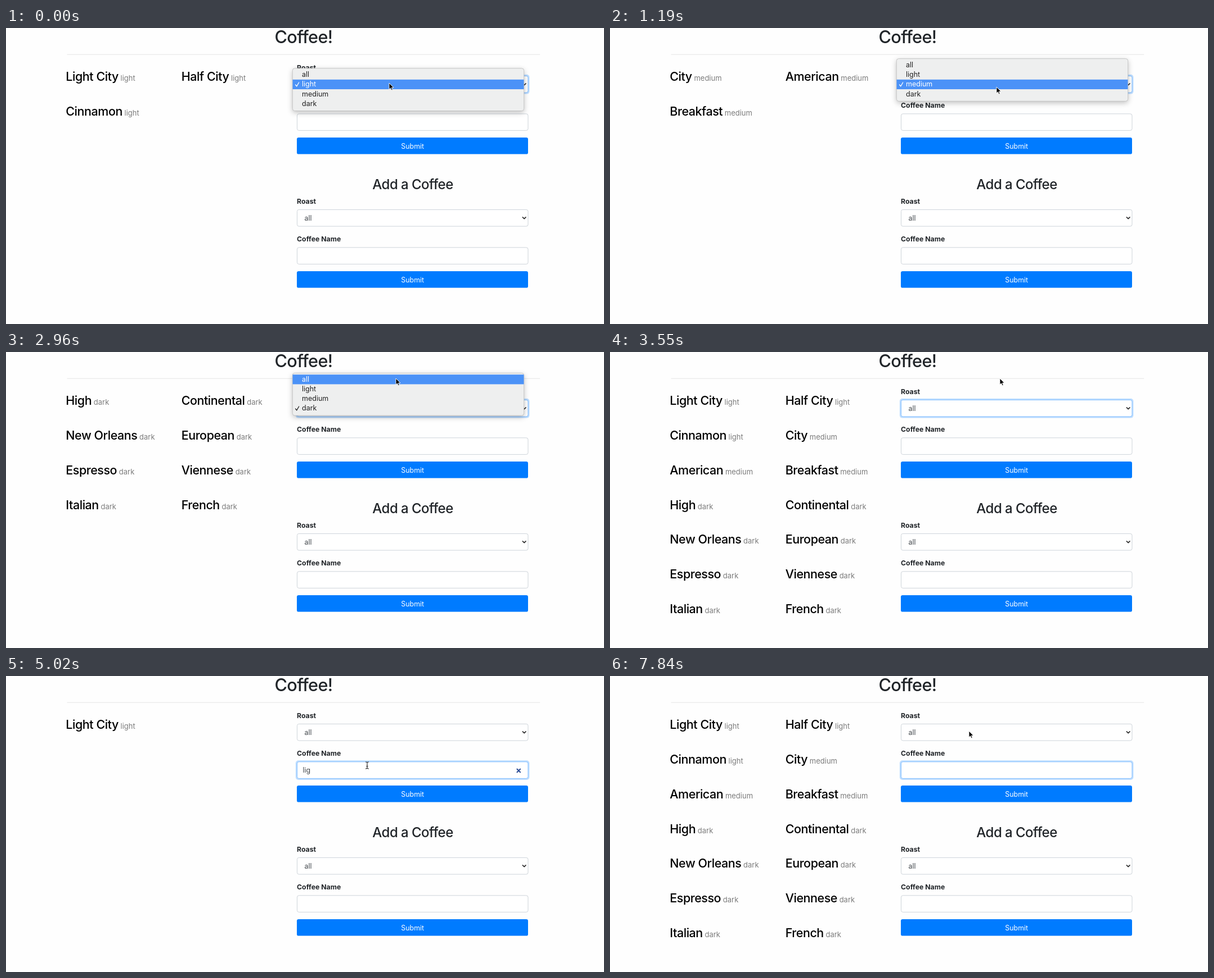
Write an HTML page that moves like this. It is 1063 px wide and 527 px high and loops after 7.99 s.

```html
<!DOCTYPE html>
<html lang="en">
<head>
<meta charset="utf-8">
<title>Coffee!</title>
<style>
  html, body { margin: 0; width: 100%; height: 100%; overflow: hidden; background: #fefefe; }
  svg { display: block; width: 100%; height: 100%; }
  text { font: 400 12.4px Inter, Roboto, sans-serif; fill: #212529; white-space: pre; }
  .title { font-size: 30.7px; font-weight: 500; letter-spacing: -.022em; text-anchor: middle; }
  .subtitle { font-size: 24.1px; font-weight: 500; letter-spacing: -.024em; text-anchor: middle; }
  .coffee { font-size: 21.5px; font-weight: 500; letter-spacing: -.0215em; fill: #000; }
  .roast { font-size: 13px; font-weight: 400; letter-spacing: 0; fill: #7c7c7c; }
  .label { font-size: 12.3px; font-weight: 700; }
  .value { fill: #43484d; }
  .button { fill: #fff; text-anchor: middle; }
  .field { fill: #fff; stroke: #ced4da; }
  .ring { fill: #bfdeff; }
  .menu { filter: drop-shadow(0 3px 5px rgba(0, 0, 0, .24)); }
  .option { font-size: 12.5px; fill: #222; }
  .hot { fill: #fff; }
  .line { fill: none; stroke-linecap: round; stroke-linejoin: round; }
</style>
</head>
<body>
<svg id="stage" viewBox="0 0 1063 527" xmlns="http://www.w3.org/2000/svg"></svg>
<script>
const LOOP = 7990;
const ROASTS = ['all', 'light', 'medium', 'dark'];
const COFFEES = [
  ['Light City', 1], ['Half City', 1], ['Cinnamon', 1],
  ['City', 2], ['American', 2], ['Breakfast', 2],
  ['High', 3], ['Continental', 3], ['New Orleans', 3], ['European', 3],
  ['Espresso', 3], ['Viennese', 3], ['Italian', 3], ['French', 3],
];
const ROW = 17.2;

// Each entry changes part of the state from its time on.
const open = (roast) => ({ menu: true, hot: roast, fade: 1 });
const at = (x, y, pointer = 'arrow') => ({ x, y, pointer });
const STEPS = [
  [0, { roast: 1, query: '', focus: 'select', caret: false, ...open(1), ...at(681, 98) }],
  [300, { hot: 2, ...at(685, 109) }],
  [450, at(687, 113)],
  [900, { fade: .1 }],
  [1050, { roast: 2, menu: false, ...at(687, 109) }],
  [1190, { ...open(2), ...at(687, 105) }],
  [1490, { hot: 3, ...at(687, 110) }],
  [1780, { hot: -1 }],
  [1930, { hot: 3 }],
  [2080, { fade: .1 }],
  [2220, { roast: 3, menu: false }],
  [2370, { ...open(3), ...at(688, 105) }],
  [2670, { hot: 2, ...at(690, 86) }],
  [2820, { hot: 1, ...at(692, 66) }],
  [2960, { hot: 0, ...at(693, 47) }],
  [3110, { hot: -1 }],
  [3260, { hot: 0 }],
  [3410, { fade: .1 }],
  [3550, { roast: 0, menu: false }],
  [3700, at(684, 86)],
  [3840, at(662, 122)],
  [3990, at(644, 155, 'beam')],
  [4140, at(642, 159, 'beam')],
  [4280, { focus: 'moving', caret: true }],
  [4430, { focus: 'input' }],
  ...[...'light'].map((_, i) => [4720 + 150 * i, { query: 'light'.slice(0, i + 1), caret: false }]),
  [5770, { query: 'ligh' }],
  [5920, { query: 'lig' }],
  [6060, { query: 'li' }],
  [6210, { query: 'l' }],
  [6360, { query: '', caret: true }],
  [6950, { caret: false }],
  [7100, at(641, 152, 'beam')],
  [7250, at(638, 137)],
  [7400, at(638, 117)],
  [7550, at(637, 98)],
  [7690, at(637, 87)],
  [7840, at(638, 98)],
];

const text = (cls, x, y, content) => `<text class="${cls}" x="${x}" y="${y}">${content}</text>`;
const rect = (x, y, w, h, r, attrs) =>
  `<rect x="${x}" y="${y}" width="${w}" height="${h}" rx="${r}" ${attrs}/>`;
const line = (d, color, width) =>
  `<path class="line" d="${d}" stroke="${color}" stroke-width="${width}"/>`;

function field(y, focused, tinted) {
  const ring = focused ? rect(514.8, y - 2.6, 415.7, 34.8, 5, 'class="ring"') : '';
  const tint = focused || tinted ? `style="stroke:${focused ? '#80bdff' : '#b3d2f2'}"` : '';
  return ring + rect(517.5, y, 410.5, 29.6, 3.2, `class="field" ${tint}`);
}

function form(roast, query, focus, caret) {
  return text('label', 517, 74.5, 'Roast')
    + field(85.4, focus === 'select', focus === 'moving')
    + text('value', 530.5, 104.8, ROASTS[roast])
    + line('M918.4 98.8l2.8 2.9 2.8-2.9', '#333', 1.7)
    + text('label', 517, 141.6, 'Coffee Name')
    + field(152.8, focus === 'input' || focus === 'moving')
    + text('value', 527.4, 172, query)
    + (caret ? line('M528.4 161v13', '#333', 1) : '')
    + (query ? line('M908.5 165.7l5.6 5.6m0-5.6l-5.6 5.6', '#2b4c96', 2.1) : '')
    + rect(517, 195, 411, 29.6, 3.2, 'fill="#007bff"')
    + text('button', 722.7, 214.6, 'Submit');
}

function coffees({ roast, query }) {
  return COFFEES
    .filter(([name, kind]) => (!roast || kind === roast) && name.toLowerCase().includes(query))
    .map(([name, kind], i) => text('coffee', 106.3 + 205.4 * (i % 2), 94 + 61.85 * (i >> 1),
      `${name}<tspan class="roast"> ${ROASTS[kind]}</tspan>`))
    .join('');
}

function menu({ roast, hot, fade }) {
  const top = 91.8 - ROW * roast;
  const options = ROASTS.map((name, i) => {
    const y = top + ROW * i;
    const lit = i === hot;
    return (lit ? rect(509.5, y, 411, ROW, 0, 'fill="#4b92f7"') : '')
      + text(lit ? 'option hot' : 'option', 526, y + 12.5, name)
      + (i === roast ? line(`M514.6 ${y + 9.2}l2.1 2.8 4-6.8`, lit ? '#fff' : '#222', 1.3) : '');
  }).join('');
  return `<g opacity="${fade}">`
    + rect(509.3, top - 2.8, 411.4, 75.7, 4, 'class="menu" fill="#eeefef" stroke="#bcbcbc" stroke-width=".8"')
    + options + '</g>';
}

function pointer({ x, y, pointer }) {
  const shape = pointer === 'beam'
    ? line('M-2.6-6q2.6 0 2.6 1.6v8.8q0 1.6-2.6 1.6M2.6-6q-2.6 0-2.6 1.6M2.6 6q-2.6 0-2.6-1.6M-1.3 1.8h2.6', '#222', 1.1)
    : '<path d="M0 0v11.2l2.6-2.4 1.7 3.9 1.9-.8-1.7-3.8h3.6z" fill="#000" stroke="#fff" stroke-width=".9"/>';
  return `<g transform="translate(${x} ${y})">${shape}</g>`;
}

function scene(state) {
  return text('title', 529, 27, 'Coffee!')
    + line('M109 47.2h840', '#e5e5e5', 1)
    + coffees(state)
    + form(state.roast, state.query, state.focus, state.caret)
    + text('subtitle', 723, 286.7, 'Add a Coffee')
    + `<g transform="translate(0 238)">${form(0, '', '', false)}</g>`
    + (state.menu ? menu(state) : '')
    + pointer(state);
}

const stage = document.getElementById('stage');
const start = performance.now();
let shown = 0;

function frame() {
  const time = (performance.now() - start) % LOOP;
  const past = STEPS.filter(([from]) => from <= time);
  if (past.length !== shown) {
    shown = past.length;
    stage.innerHTML = scene(Object.assign({}, ...past.map(([, change]) => change)));
  }
  requestAnimationFrame(frame);
}
frame();
</script>
</body>
</html>
```
